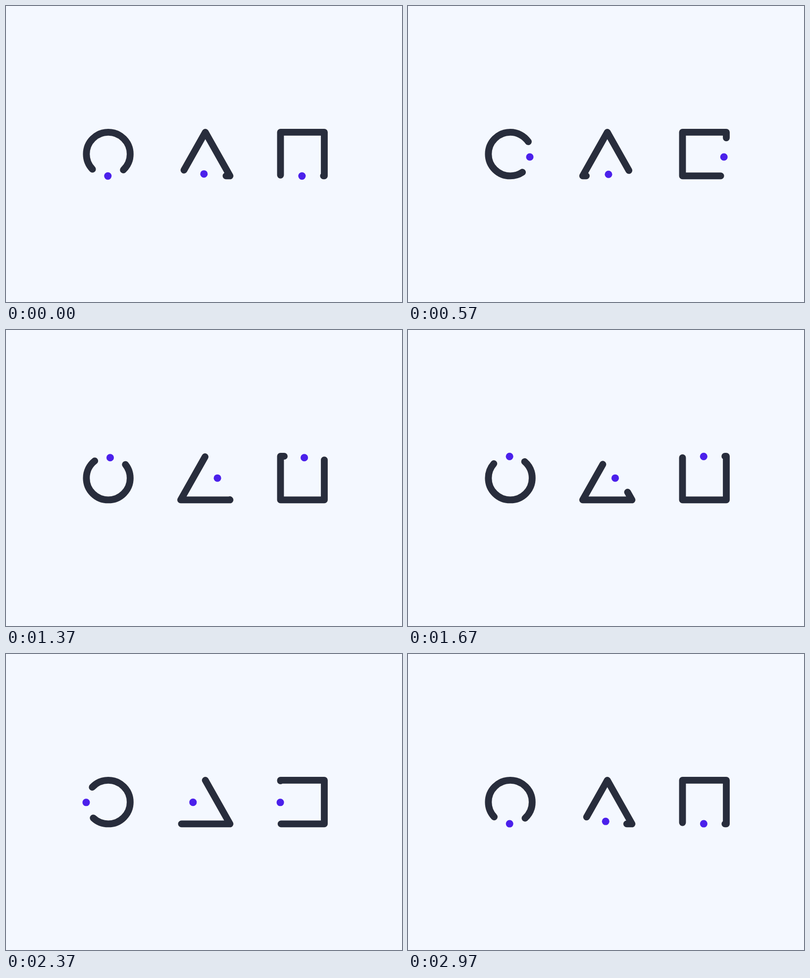
Animation, 800 px wide and 600 px high, one loop 3.01 s. Source, as an HTML page:

```html
<!DOCTYPE html>
<html lang="en">
<head>
<meta charset="utf-8">
<title>Shape loaders</title>
<style>
  html, body { margin: 0; width: 100%; height: 100%; overflow: hidden; background: #f4f8ff; }
  svg { display: block; width: 100vw; height: 100vh; }
  .path { fill: none; stroke: #282d3c; stroke-width: 10; stroke-linejoin: round; stroke-linecap: round; }
  .dot { fill: #4b20eb; }
</style>
</head>
<body>
<svg viewBox="0 0 800 600">
  <g transform="translate(402.7 300.2) scale(2.514)">
    <g id="circle" transform="translate(-78 0)">
      <circle class="path" r="32" transform="scale(.55)" stroke-dasharray="150 50"/>
      <circle class="dot" r="3"/>
    </g>
    <g id="triangle">
      <polygon class="path" points="0 -32 36 32 -36 32" transform="scale(.55)" stroke-dasharray="145 76"/>
      <circle class="dot" r="3"/>
    </g>
    <g id="square" transform="translate(78 0)">
      <rect class="path" x="-32" y="-32" width="64" height="64" transform="scale(.55)" stroke-dasharray="192 64"/>
      <circle class="dot" r="3"/>
    </g>
  </g>
</svg>
<script>
const LOOP = 3010, DURATION = 3000, START = 682;
const FPS = 30, STEPS = 90;

const diamond = [[-18, 0], [0, 18], [18, 0], [0, -18], [-18, 0]];
const quarters = [0, .25, .5, .75, 1];
const loaders = [
  { id: 'circle', stops: quarters, offsets: [75, 125, 175, 225, 275], dots: diamond },
  { id: 'triangle', stops: [0, .33, .66, 1], offsets: [0, 74, 147, 221],
    dots: [[-10, 0], [0, 18], [10, 0], [-10, 0]] },
  { id: 'square', stops: quarters, offsets: [0, 64, 128, 192, 256], dots: diamond }
];
for (const loader of loaders) {
  const group = document.getElementById(loader.id);
  loader.path = group.querySelector('.path');
  loader.dot = group.querySelector('.dot');
}

const bezier = (a, b, s) => 3 * (1 - s) ** 2 * s * a + 3 * (1 - s) * s * s * b + s ** 3;

// cubic-bezier(.785, .135, .15, .86), solved by bisection
function ease(x) {
  let low = 0, high = 1;
  for (let i = 0; i < 30; i++) {
    const mid = (low + high) / 2;
    if (bezier(.785, .15, mid) < x) low = mid; else high = mid;
  }
  return bezier(.135, .86, low);
}

const mix = (a, b, k) => a + (b - a) * k;

function draw(time) {
  const step = Math.min(STEPS - 1, Math.floor((time % LOOP + 4) * FPS / 1000));
  const phase = (START + step * 1000 / FPS) % DURATION / DURATION;
  for (const { stops, offsets, dots, path, dot } of loaders) {
    const i = stops.findIndex(stop => stop > phase) - 1;
    const k = ease((phase - stops[i]) / (stops[i + 1] - stops[i]));
    path.setAttribute('stroke-dashoffset', mix(offsets[i], offsets[i + 1], k));
    dot.setAttribute('cx', mix(dots[i][0], dots[i + 1][0], k));
    dot.setAttribute('cy', mix(dots[i][1], dots[i + 1][1], k));
  }
}

const begin = performance.now();
function tick() {
  draw(performance.now() - begin);
  requestAnimationFrame(tick);
}
tick();
</script>
</body>
</html>
```
